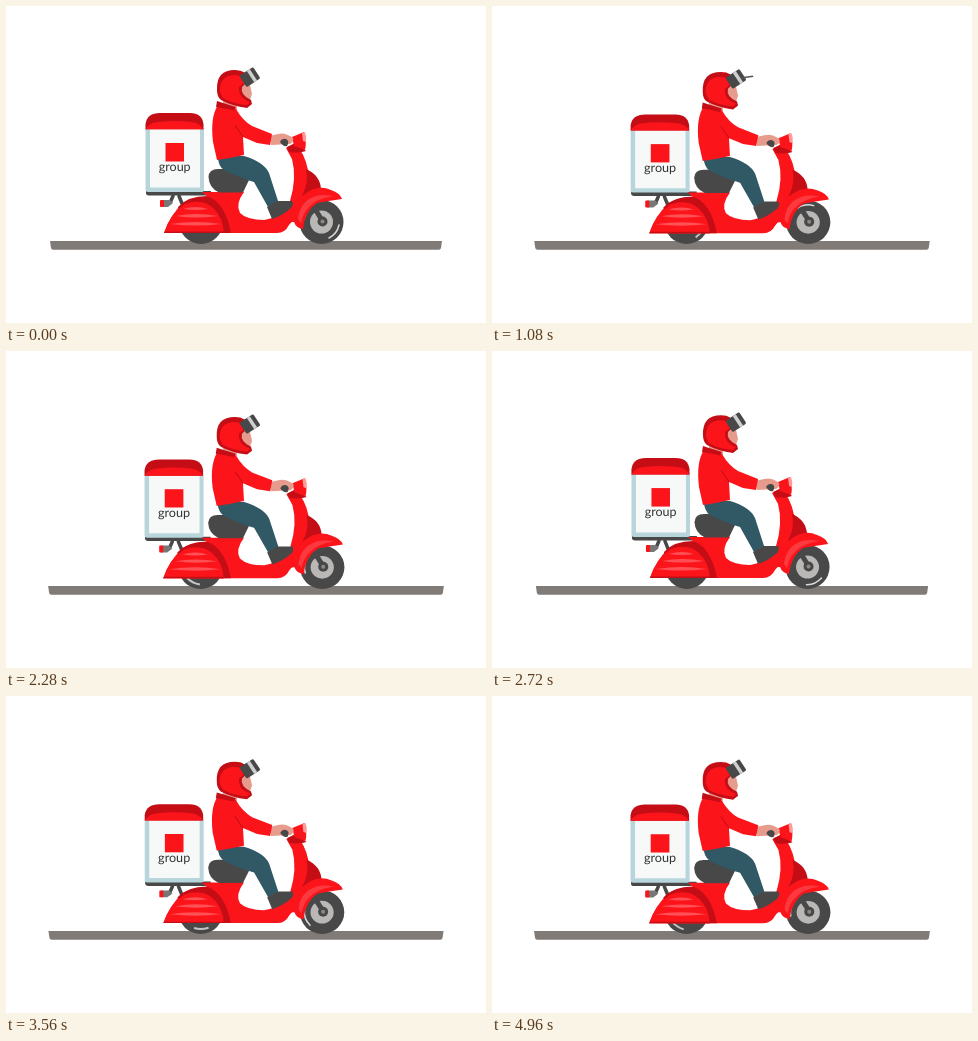
An HTML page for the animation above (5000 ms loop, 480x317 px).

```html
<!DOCTYPE html>
<html lang="en">
<head>
<meta charset="utf-8">
<title>Delivery scooter</title>
<style>
  html, body { margin: 0; width: 100%; height: 100%; overflow: hidden; background: #fff; }
  svg { display: block; width: 100vw; height: 100vh; }
  .red { fill: #fc141b; }
  .deep { fill: #c50d16; }
  .soft { fill: #ff5055; }
  .dark { fill: #484848; }
  .skin { fill: #e79b8d; }
  .line { fill: none; stroke: #484848; stroke-linecap: round; }
  text { font: 12.5px Lato, "Open Sans", sans-serif; fill: #333; text-anchor: middle; text-rendering: geometricPrecision; }
</style>
</head>
<body>
<svg viewBox="0 0 480 317">
  <g id="scene">
    <path fill="#817b77" d="M44 235H436L435 242Q434.500 243.700 433 243.700H47Q45.500 243.700 45 242Z"/>

    <!-- wheels -->
    <circle class="dark" cx="195" cy="216" r="22"/>
    <g id="rear" fill="none" stroke="#c4c4c4" stroke-width="2">
      <path d="M204 201Q210 206 212 213M178 219Q177 215 178 211"/>
    </g>
    <circle class="dark" cx="315.500" cy="216" r="22"/>
    <circle fill="#b9b8b6" cx="315.500" cy="216" r="11.500"/>
    <g id="front" fill="none" stroke="#d9d9d9" stroke-width="1.500" stroke-linecap="round">
      <path d="M333 219Q331 228 323 232"/>
    </g>
    <path class="line" stroke-width="5" d="M309 203L316.500 215"/>
    <circle class="dark" cx="316.500" cy="215.500" r="5"/>
    <circle fill="#8b8987" cx="316.500" cy="215.500" r="2"/>

    <!-- rack and tail light -->
    <path class="line" stroke-width="3.500" d="M173 190L179 205M167 190L164 197"/>
    <path fill="#777" d="M156 194H164L167 197L162 201H156Z"/>
    <rect class="red" x="154" y="194" width="4" height="7" rx="1"/>
    <path class="dark" d="M140 185H205V189.500H143Q140 189.500 140 187Z"/>

    <!-- box -->
    <path fill="#b8d5dc" d="M139.500 122H198V184Q198 186 196 186H142Q140 186 139.500 184Z"/>
    <path fill="#f7f9f9" d="M144 122H194V181.500H144Z"/>
    <path class="deep" d="M139.500 123.300V118Q141 107 154 107H184Q196 107 197.500 118V123.300Z"/>
    <path class="red" d="M139.500 123.300Q143 117 152 116Q168 114 185 116Q194 117 197.500 123.300Z"/>
    <rect class="red" x="159.500" y="137" width="18.500" height="18.500"/>
    <text x="168.700" y="165">group</text>

    <!-- bodywork -->
    <path class="red" d="M196 186H238Q229 198 234 207Q241 214 258 214Q277 211 284 195Q291 172 286 153L280 142L289 137Q299 148 302 164L312 180L296 216Q288 212 283 219Q279 227 271 227H158Q164 209 177 197Q185 191 202 191Z"/>
    <path class="deep" d="M172 201Q182 190 201 190Q219 196 225 227H180Z"/>
    <path class="red" d="M158 227Q164 208 179 198Q196 192 207 202Q217 211 218 227Z"/>
    <path class="soft" d="M177 203Q190 199 202 203Q190 205 177 203ZM170 210Q190 206 212 210Q190 213 170 210ZM164 218Q190 214 215 218Q190 221 164 218Z"/>
    <path class="deep" d="M158 227L159 225.500H218V227Z"/>
    <path class="deep" d="M300 163Q314 169 315 183L296 190Q303 177 300 163Z"/>
    <path class="red" d="M284 216Q286 198 299 188Q312 178 325 184Q334 187 336 193Q322 195 311 197Q299 205 297 223Q290 222 288 216Z"/>
    <path fill="#fb393f" d="M292 213Q294 195 310 190Q318 188 327 190Q309 193 302 202Q297 207 295 217Z"/>

    <!-- seat -->
    <path class="dark" d="M202.500 171Q203 163 212 163H236Q245 165 243.500 173L237 186.500H213Q203 182 202.500 171Z"/>

    <!-- handlebar and headlight -->
    <path class="deep" d="M281 141L290 137L300 145L296 146Q288 147 283 146Z"/>
    <path class="red" d="M286 131L298 126Q301 136 299 144L288 140Z"/>
    <path fill="#ff9b98" d="M296 127L299 126Q301 131 300 136L297 135Z"/>

    <!-- rider -->
    <path fill="#305865" d="M212 150H238Q258 156 263 167L272 195L262 201L248 176Q234 172 218 164Q212 160 212 150Z"/>
    <path class="dark" d="M261 201L271 195L286 195Q288 198 285 202Q276 210 266 213Z"/>
    <path class="skin" d="M217 89H231V104H217Z"/>
    <path class="skin" d="M263 130L272 128Q279 126 287 132Q288 136 284 138L265 139Z"/>
    <path class="dark" d="M274 136Q276 132 280 133Q284 135 281 140Q277 141 274 136Z"/>
    <path class="red" d="M212 99Q224 99 230 103Q237 115 246 120L266 128L264 139L251 137L237 131L238 149Q225 152 211 154L207 136Q204 111 212 99Z"/>
    <path fill="none" stroke="#c50d16" d="M237 131L229 119"/>
    <path class="deep" d="M211 95L217 97L230 101L228 104.500Q217 102 210 101Z"/>

    <!-- helmet -->
    <g transform="translate(0 1)">
      <path class="skin" d="M232 76L244 78L246 87L243 96L233 93Z"/>
      <path class="deep" d="M211 83Q210 63 229 63Q241 63 243 73L236 80Q234 88 245 93L246 97L241 101Q226 99 215 93Q211 90 211 83Z"/>
      <path class="red" d="M214 85Q213 69 228 68Q237 68 239 75L233 80Q232 91 244 95L241 98Q227 97 217 91Z"/>
    </g>
    <g transform="rotate(-33 243.500 71)">
      <rect class="dark" x="235.500" y="64.500" width="16.500" height="13.500" rx="1.500"/>
      <path fill="#cfcfcf" d="M244.500 64.500H248V78H244.500Z"/>
    </g>
    <path id="glint" fill="none" stroke="#555" stroke-width="1.500" d="M250 70L261 68.500" visibility="hidden"/>
  </g>
</svg>
<script>
  const LOOP = 5000, STEP = 40, TURN = 2000 / 3;
  const el = id => document.getElementById(id);
  const scene = el('scene'), rear = el('rear'), front = el('front'), glint = el('glint');

  function draw() {
    const t = Math.floor(performance.now() % LOOP / STEP) * STEP;
    const turn = t / TURN;
    const press = (1 - Math.cos(turn * 2 * Math.PI)) / 2;
    const sx = 1 + 0.0102 * press, sy = 1 - 0.0125 * press;

    // squash towards the road
    scene.setAttribute('transform', `translate(240 240) scale(${sx} ${sy}) translate(-240 -240)`);
    rear.setAttribute('transform', `rotate(${turn * 360} 195 216)`);
    front.setAttribute('transform', `rotate(${turn * 360} 315.5 216)`);
    glint.setAttribute('visibility', t >= 1040 && t <= 1120 ? 'visible' : 'hidden');
    requestAnimationFrame(draw);
  }
  draw();
</script>
</body>
</html>
```
